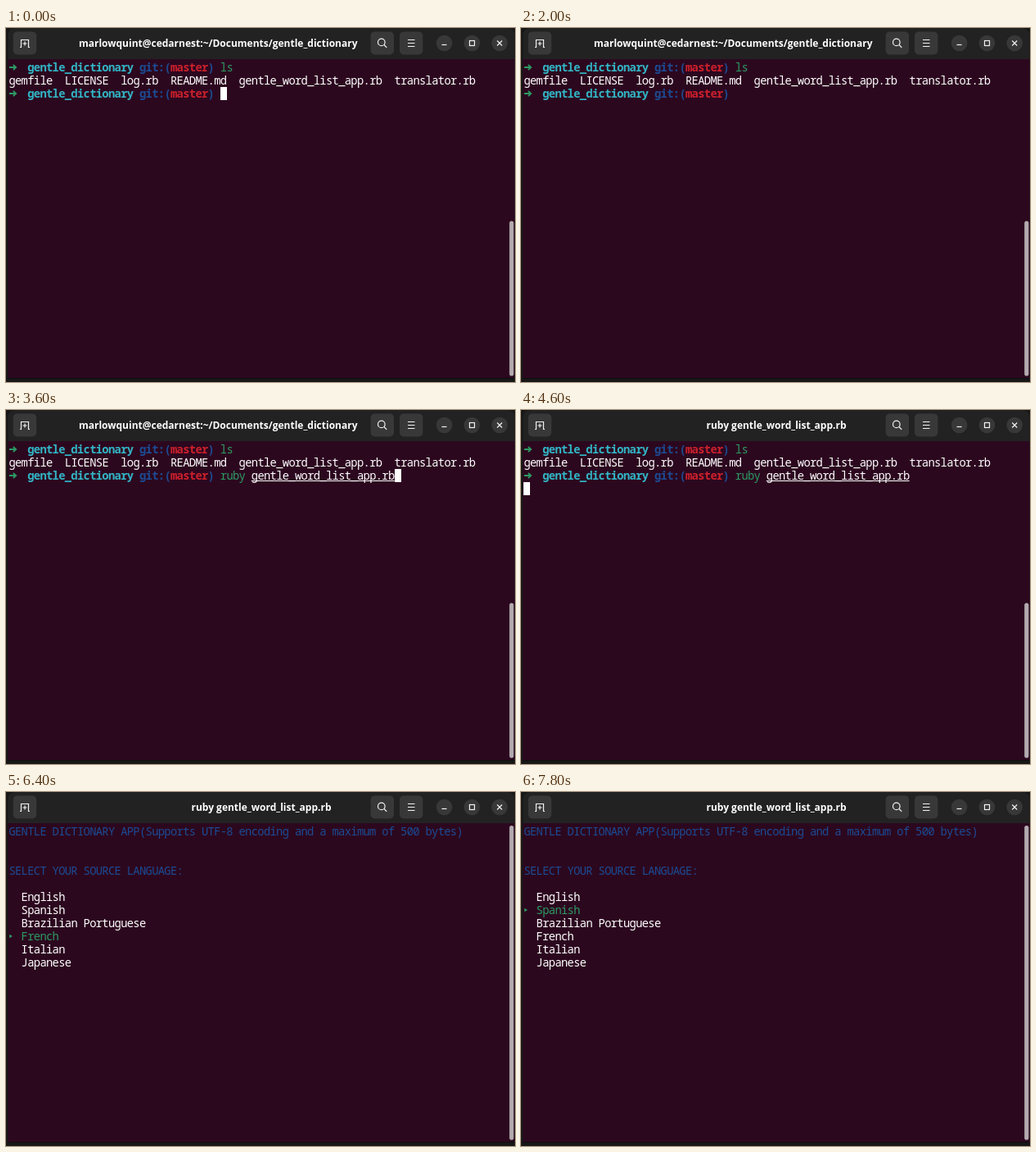
Recreate the animation shown at these times as an HTML page. Size 622 px wide and 432 px high, loop 8000 ms.

```html
<!DOCTYPE html>
<html lang="en">
<head>
<meta charset="utf-8">
<title>Terminal</title>
<style>
  html, body { margin: 0; width: 100%; height: 100%; overflow: hidden; background: #171717; }
  svg { display: block; width: 622px; height: 432px; }
  text { white-space: pre; }
  #title { font: 700 12px "Open Sans", "Noto Sans", sans-serif; fill: #fff; text-anchor: middle; }
  #screen { font-family: "Noto Sans Mono", "DejaVu Sans Mono", monospace; }
  .icon { fill: none; stroke: #f2f2f2; stroke-width: 1.2; }
</style>
</head>
<body>
<svg viewBox="0 0 622 432">
  <rect width="622" height="432" fill="#171717"/>
  <path d="M2.4 428V10Q2.4 0 12 0H612Q621.5 0 621.5 10V428Z" fill="#222"/>
  <rect x="2.4" y="38" width="619" height="389" fill="#2c081f"/>
  <path d="M2 427.5H621" stroke="#0d0d0d"/>
  <g fill="#383838">
    <rect x="8.8" y="4.4" width="28.4" height="28" rx="5"/>
    <rect x="445.6" y="4.4" width="28.4" height="28" rx="5"/>
    <rect x="481" y="4.4" width="28.4" height="28" rx="5"/>
    <circle cx="535.6" cy="18.5" r="9.8"/>
    <circle cx="569.4" cy="18.5" r="9.8"/>
    <circle cx="603.2" cy="18.5" r="9.8"/>
  </g>
  <g class="icon">
    <path d="M17 23.5H18.5V14.5H27.5V23.5H29M23 16.5V21.5M20.5 19H25.5"/>
    <circle cx="458.8" cy="17.4" r="4.3"/>
    <path d="M461.9 20.5L465.3 23.9"/>
    <path d="M491 14.5H499.5M491 18.5H499.5M491 22.5H499.5"/>
    <path d="M532.5 20.5H538.5"/>
    <rect x="566.5" y="15.5" width="6" height="6"/>
    <path d="M600.2 15.5L606.2 21.5M606.2 15.5L600.2 21.5"/>
  </g>
  <text id="title" y="23"></text>
  <g id="screen"></g>
  <rect id="thumb" x="615.2" width="5.2" rx="2.6" fill="#b3abb0"/>
</svg>
<script>
const LOOP = 8000;
const ADV = 7.6, ROW = 16, LEFT = 3.4, TOP = 40, SIZE = 13.8;
const SPACING = ADV - SIZE * 0.6;
const TITLE_MID = 312, TITLE_RIGHT = 429.5;
const C = {
  white: '#fff', green: '#2c9a63', cyan: '#32b5c5', blue: '#1c4b93',
  red: '#cc202c', gray: '#625863'
};
const DIR = 'gentle_dictionary';
const APP = 'gentle_word_list_app.rb';
const COMMAND = 'ruby';
const CMD_COL = 34;
const APP_COL = CMD_COL + COMMAND.length + 1;
const END_COL = APP_COL + APP.length;
const LANGUAGES = ['English', 'Spanish', 'Brazilian Portuguese', 'French', 'Italian', 'Japanese'];

// Key presses and hard changes, in ms
const TYPE_START = 2200, TYPE_STEP = 100, ACCEPT = 3500, RUN = 4300, MENU = 4700;
const BLINK = 600;
const MOVES = [[6000, 1], [6200, 2], [6400, 3], [6600, 4], [6700, 5],
               [7200, 4], [7400, 3], [7600, 2], [7800, 1]];

const $ = id => document.getElementById(id);
const colX = col => LEFT + col * ADV;
const rowY = row => TOP + row * ROW;

function run(row, col, str, color, bold) {
  return `<text x="${colX(col)}" y="${rowY(row) + 12.5}" font-size="${SIZE}" ` +
    `letter-spacing="${SPACING}" font-weight="${bold ? 700 : 400}" fill="${color}">${str}</text>`;
}

function block(row, col, color = C.white) {
  return `<rect x="${Math.round(colX(col))}" y="${rowY(row)}" width="8" height="${ROW}" fill="${color}"/>`;
}

function prompt(row) {
  const y = rowY(row) + 8;
  return `<path d="M4 ${y}H12M8.8 ${y - 3.2}L12.2 ${y}L8.8 ${y + 3.2}" fill="none" stroke="${C.green}" stroke-width="1.8"/>` +
    run(row, 3, DIR, C.cyan, true) + run(row, 21, 'git:(', C.blue, true) +
    run(row, 26, 'master', C.red, true) + run(row, 32, ')', C.blue, true);
}

function listing() {
  const files = [[0, 'gemfile'], [9, 'LICENSE'], [18, 'log.rb'], [26, 'README.md'], [37, APP], [62, 'translator.rb']];
  return prompt(0) + run(0, CMD_COL, 'ls', C.green) +
    files.map(([col, name]) => run(1, col, name, C.white)).join('') + prompt(2);
}

// The cursor is lit for one period after each key, then dark for one
const lit = since => Math.floor(since / BLINK) % 2 === 0;

function typing(t) {
  const count = Math.min(COMMAND.length, Math.floor((t - TYPE_START) / TYPE_STEP) + 1);
  if (count <= 0) return lit(t) ? block(2, CMD_COL) : '';
  const known = count === 1 || count === COMMAND.length;
  const col = CMD_COL + count;
  const rest = COMMAND.slice(count);
  const lastKey = TYPE_START + (count - 1) * TYPE_STEP;
  const on = lit(t - lastKey);
  let out = run(2, CMD_COL, COMMAND.slice(0, count), known ? C.green : C.red, !known);
  if (on) out += block(2, col, '#716671');
  if (rest) {
    out += run(2, col, rest[0], on ? '#2c081f' : C.gray);
    out += run(2, col + 1, rest.slice(1), C.gray);
  }
  return out + run(2, APP_COL, APP, C.gray);
}

function command(t) {
  const line = run(2, CMD_COL, COMMAND, C.green) + run(2, APP_COL, APP, C.white) +
    `<rect x="${colX(APP_COL)}" y="${rowY(2) + 14}" width="${APP.length * ADV}" height="1" fill="#fff"/>`;
  if (t >= RUN) return line + block(3, 0);
  return line + (lit(t - ACCEPT) ? block(2, END_COL) : '');
}

function menu(t) {
  const past = MOVES.filter(([at]) => at <= t);
  const picked = past.length ? past[past.length - 1][1] : 0;
  let out = run(0, 0, 'GENTLE DICTIONARY APP(Supports UTF-8 encoding and a maximum of 500 bytes)', C.blue) +
    run(3, 0, 'SELECT YOUR SOURCE LANGUAGE:', C.blue);
  if (!past.length) {
    out += run(4, 1, '(Press', C.gray) + run(4, 8, '↑', C.gray) + run(4, 9, '/', C.gray) +
      run(4, 10, '↓', C.gray) + run(4, 12, 'arrow to move and Enter to select)', C.gray);
  }
  LANGUAGES.forEach((name, i) => {
    out += run(5 + i, 2, name, i === picked ? C.green : C.white);
  });
  const y = rowY(5 + picked) + 8;
  return out + `<path d="M4.2 ${y - 2.2}L8 ${y}L4.2 ${y + 2.2}Z" fill="${C.green}"/>`;
}

// Centred in the window, but pushed left when it would reach the buttons
function setTitle(str) {
  const title = $('title');
  title.textContent = str;
  const half = title.getComputedTextLength() / 2;
  title.setAttribute('x', Math.min(TITLE_MID, TITLE_RIGHT - half));
}

let shown = '';
function draw(t) {
  const inMenu = t >= MENU;
  const body = inMenu ? menu(t) : listing() + (t < ACCEPT ? typing(t) : command(t));
  const title = t < RUN ? `marlowquint@cedarnest:~/Documents/${DIR}` : `ruby ${APP}`;
  if (title + body === shown) return;
  shown = title + body;
  setTitle(title);
  $('screen').innerHTML = body;
  const top = inMenu ? 41 : 235.5;
  $('thumb').setAttribute('y', top);
  $('thumb').setAttribute('height', 424.5 - top);
}

const start = performance.now();
function tick() {
  draw((performance.now() - start) % LOOP);
  requestAnimationFrame(tick);
}
draw(0);
requestAnimationFrame(tick);
</script>
</body>
</html>
```
